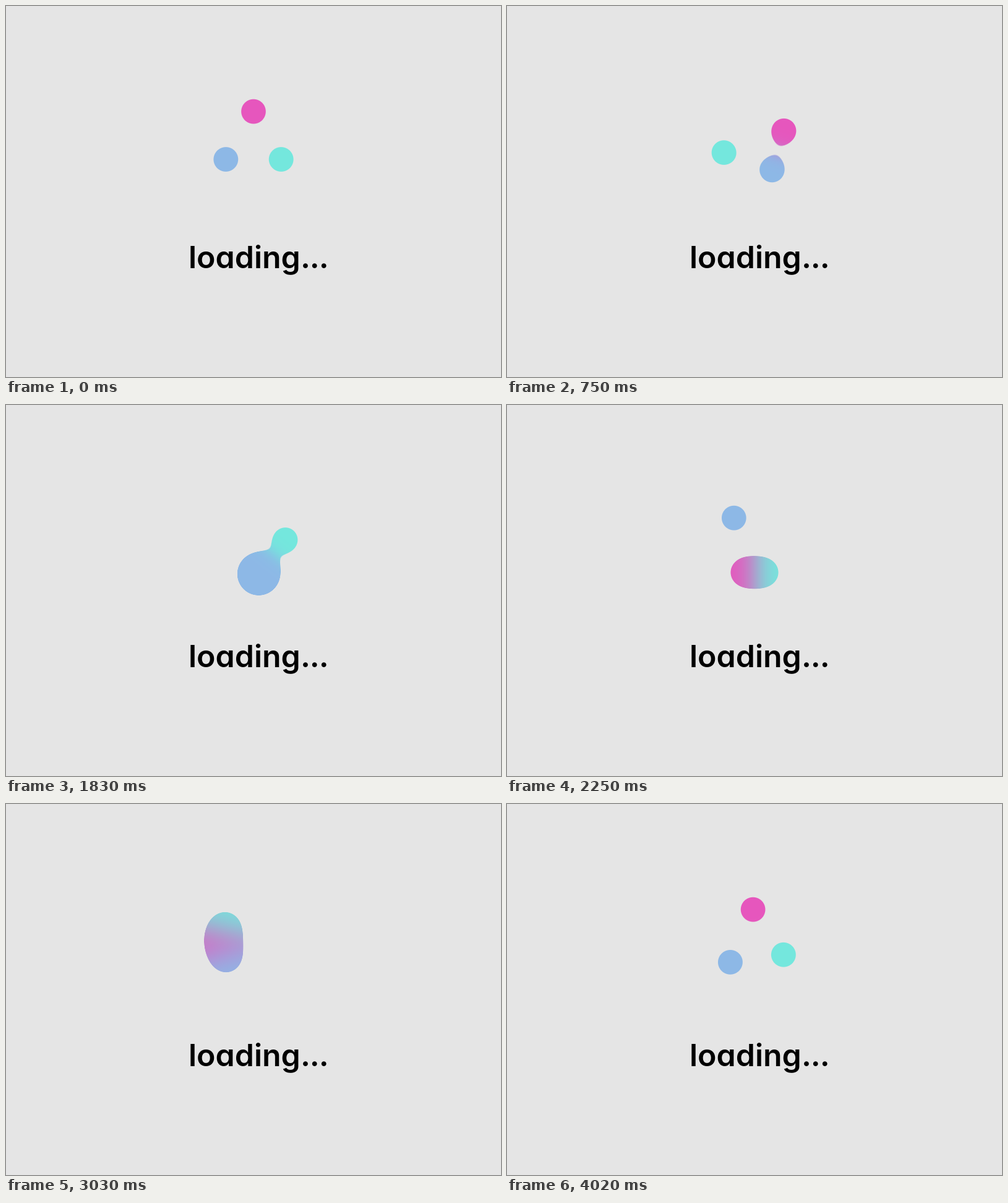
These frames come from a looping animation (800 by 600 pixels, 4.05 s). An HTML page with a canvas:

```html
<!DOCTYPE html>
<html lang="en">
<head>
<meta charset="utf-8">
<title>Loading</title>
<style>
  html, body { margin: 0; width: 100%; height: 100%; overflow: hidden; background: #e5e5e5; }
  canvas, svg { position: absolute; left: 0; top: 0; display: block; }
  text {
    font: 600 50px Inter, "Open Sans", sans-serif;
    font-feature-settings: "cv11";
  }
  .dots { letter-spacing: -1px; }
</style>
</head>
<body>
<canvas id="stage" width="800" height="600"></canvas>
<svg width="800" height="600"><text x="295" y="424">loading<tspan class="dots">...</tspan></text></svg>
<script>
const ctx = document.getElementById('stage').getContext('2d');
const LOOP = 4050, STEP = 30;
const BG = [229, 229, 229];
const CENTER = { x: 400, y: 222.2 }, ORBIT = 51.7;
const RADIUS = 19.8, SPREAD = 900;
const AREA = { x: 290, y: 110, w: 220, h: 230 };

// Each ball makes a whole number of turns per loop; later ones win when merging.
const balls = [
  { color: [230, 86, 189], start: 0, turns: 1 },
  { color: [116, 231, 221], start: 120, turns: 2 },
  { color: [141, 184, 230], start: 240, turns: 4 }
];
const merges = [
  { from: 0, to: 2, gain: 2.45 },
  { from: 1, to: 2, gain: 1.95 },
  { from: 0, to: 1, gain: 1.5 }
];

const image = ctx.createImageData(AREA.w, AREA.h);
const clamp = v => Math.min(1, Math.max(0, v));
const smooth = v => { v = clamp(v); return v * v * (3 - 2 * v); };

function place(t) {
  for (const b of balls) {
    const a = (b.start + 360 * b.turns * t / LOOP) * Math.PI / 180;
    b.x = CENTER.x + ORBIT * Math.sin(a);
    b.y = CENTER.y - ORBIT * Math.cos(a);
    b.mass = 1;
  }
  for (const { from, to, gain } of merges) {
    const a = balls[from], b = balls[to];
    const near = smooth((22 - Math.hypot(a.x - b.x, a.y - b.y)) / 14);
    b.mass += (gain - 1) * near;
    a.mass *= 1 - near;
  }
}

function draw(t) {
  place(t);
  const px = image.data, r2 = RADIUS * RADIUS;
  let i = 0;
  for (let y = 0; y < AREA.h; y++) {
    for (let x = 0; x < AREA.w; x++, i += 4) {
      let field = 0, r = 0, g = 0, b = 0;
      for (const ball of balls) {
        const dx = AREA.x + x + 0.5 - ball.x, dy = AREA.y + y + 0.5 - ball.y;
        const f = ball.mass * Math.exp((r2 - dx * dx - dy * dy) / SPREAD);
        field += f;
        r += f * ball.color[0];
        g += f * ball.color[1];
        b += f * ball.color[2];
      }
      const dist = Math.sqrt(Math.max(0, r2 - SPREAD * Math.log(field)));
      const alpha = clamp(RADIUS - dist + 0.5);
      const mix = (c, k) => BG[k] + (c / field - BG[k]) * alpha;
      px[i] = mix(r, 0);
      px[i + 1] = mix(g, 1);
      px[i + 2] = mix(b, 2);
      px[i + 3] = 255;
    }
  }
  ctx.putImageData(image, AREA.x, AREA.y);
}

ctx.fillStyle = `rgb(${BG})`;
ctx.fillRect(0, 0, 800, 600);

let origin = null, last = -1;
function tick(now) {
  if (origin === null) origin = now;
  const t = Math.floor(((now - origin) % LOOP) / STEP) * STEP;
  if (t !== last) draw(last = t);
  requestAnimationFrame(tick);
}
draw(0);
requestAnimationFrame(tick);
</script>
</body>
</html>
```
